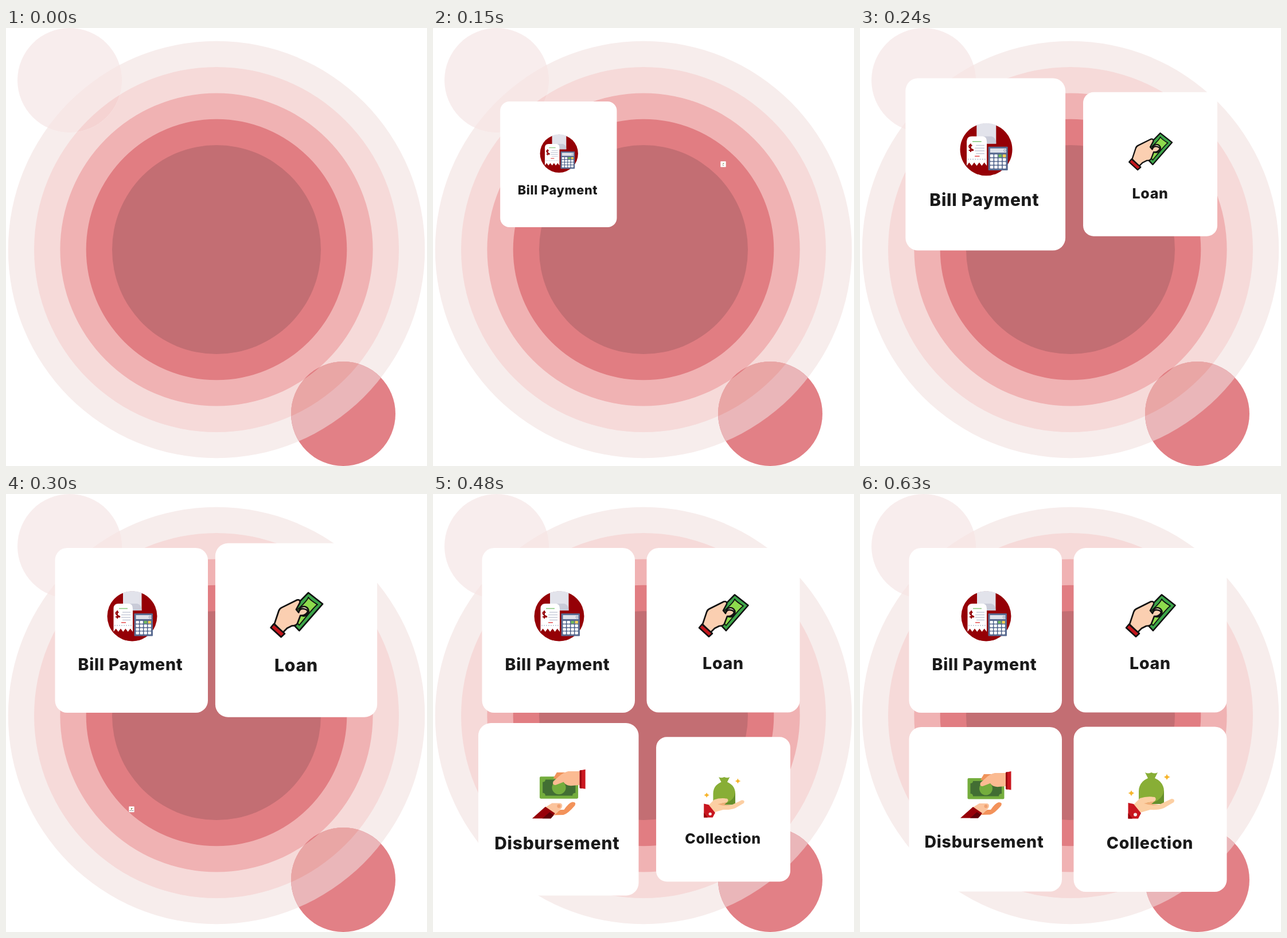
An HTML page for the animation above (2670 ms loop, 734 px wide and 763 px high).

```html
<!DOCTYPE html>
<html lang="en">
<head>
<meta charset="utf-8">
<title>Payment services</title>
<style>
html, body { margin: 0; width: 100%; height: 100%; overflow: hidden; background: #fff; }
svg { display: block; width: 734px; height: 763px; }
text { font: 800 28.5px Inter, "Open Sans", sans-serif; letter-spacing: .75px; text-anchor: middle; fill: #1a1a1a; }
.ink { stroke: #111; stroke-width: 2.6; stroke-linejoin: round; }
</style>
</head>
<body>
<svg viewBox="0 0 734 763">
  <defs>
    <clipPath id="top"><circle cx="111" cy="91" r="91"/></clipPath>
    <clipPath id="bottom"><circle cx="588" cy="672" r="91"/></clipPath>
  </defs>
  <g id="rings"></g>

  <g class="card">
    <rect x="85.5" y="94" width="266.5" height="287" rx="21" fill="#fff"/>
    <circle cx="220" cy="213" r="43.5" fill="#950006"/>
    <path d="M204 172Q220 166 236.500 172V203H204Z" fill="#e2e3eb"/>
    <path d="M215 191H229Q236.500 193 236.500 203H221Z" fill="#c9cbd8"/>
    <path d="M187.500 240V199Q188 191 196 191H215Q221 192 221 200V240l-4.200-5.500-4.200 5.500-4.200-5.500-4.200 5.500-4.200-5.500-4.200 5.500-4.200-5.500Z" fill="#fff"/>
    <g fill="none" stroke-width="1.5">
      <path d="M197 199.500H212" stroke="#84c77b"/>
      <path d="M203 206H217M201 210.500H217M201 215H217M203 219.500H217" stroke="#c6cad8"/>
      <path d="M201 224H209" stroke="#e34b4b"/>
      <path d="M189 229H220" stroke="#bbc1d0" stroke-dasharray="2 2"/>
      <path d="M196.500 206.500Q192 204 191.500 207T196.500 212.500 191 214M194 203V217" stroke="#950006" stroke-width="2"/>
    </g>
    <rect x="223.500" y="208" width="32.500" height="39.500" rx="1" fill="#596b91"/>
    <rect x="226.500" y="211" width="27" height="7" fill="#dfe2ea"/>
    <circle cx="251" cy="214.500" r="1.800" fill="none" stroke="#8791a9" stroke-width=".8"/>
    <g id="keys"></g>
    <text x="217" y="306.500">Bill Payment</text>
  </g>

  <g class="card">
    <rect x="372.500" y="94" width="267" height="286.500" rx="21" fill="#fff"/>
    <g class="ink">
      <path d="M526 175.500L549.500 194 511 238 488 214Z" fill="#3da64a"/>
      <path d="M526 183Q528 187 541 195 536 198 511 229L497 213Q524 190 526 183Z" fill="#8edb4d" stroke-width="1.800"/>
      <circle cx="518.500" cy="206" r="8" fill="#f7edcf"/>
      <path d="M470 227L477 206Q478 202 482 200L507 187.500Q513 186 512 192L506 203 510 208Q512 201 518 202 525 203 525 207 521 214 513 213L508 226Q506 230 499 230L491 234 484 241Z" fill="#fbcfb1"/>
      <path d="M469 227L487 243 481 248.500 464 233Z" fill="#c4161c"/>
    </g>
    <text x="506" y="305">Loan</text>
  </g>

  <g class="card">
    <rect x="85.500" y="406" width="266.500" height="286.500" rx="21" fill="#fff"/>
    <rect x="187.500" y="495" width="64" height="36.500" rx="2" fill="#74ad3d"/>
    <path d="M197 500H242Q242 504 247 504V522Q242 522 242 526.500H197Q197 522 192.500 522V504Q197 504 197 500Z" fill="#426e33"/>
    <circle cx="219.500" cy="513" r="11.500" fill="#74ad3d"/>
    <path d="M210 498L216 488H235L223 499Z" fill="#f0935b"/>
    <path d="M254 486H235Q226 488 219 495L210 503Q208 509 214 509L227 504Q232 511 242 510L254 509Z" fill="#fbbb92"/>
    <path d="M254 485L263.500 483V515.500L254 514Z" fill="#ca1820"/>
    <path d="M254 485L257 484V515L254 514Z" fill="#9a0710"/>
    <path d="M208 559L222 550H228Q236 538 242 537 249 537 246 543 234 557 227 558.500Z" fill="#f3925a"/>
    <path d="M195 547L208 539H222Q227 541 224 547L219 552Q214 559 207 559Z" fill="#fbc49d"/>
    <circle cx="219.500" cy="544" r="3" fill="#f0a273"/>
    <path d="M175 564.500L197 545 213 556 206 564.500Z" fill="#970009"/>
    <path d="M192 564.500L204 554 211 559 206 564.500Z" fill="#600008"/>
    <text x="216.500" y="616">Disbursement</text>
  </g>

  <g class="card">
    <rect x="372.500" y="405.500" width="267" height="287.500" rx="21" fill="#fff"/>
    <path d="M497 485Q502 488 508 485 514 488 519 485L514 495Q530 502 530 518V540H486V518Q486 502 502 495Z" fill="#88ae36"/>
    <path d="M530 516V540H500L514 536Q528 530 530 516Z" fill="#668f2b"/>
    <path d="M477 541L488 530Q500 526 514 528 518 532 513 535.500L500 538 506 541H522L543 531Q550 531 547 537L530 547Q520 551 506 550L489 555Z" fill="#fccfa3"/>
    <path d="M495 539L514 535 508 540 521 541Q510 544 495 539Z" fill="#f0ae79"/>
    <path d="M467.500 538L477 540 490 556 485 565.500H467.500Z" fill="#c8161f"/>
    <path d="M467.500 556L475 565.500H467.500Z" fill="#970009"/>
    <circle cx="480" cy="558.500" r="3" fill="#f4e9e9"/>
    <path d="M535 487.500Q536 492 541 493 536 494 535 498.500 534 494 529.500 493 534 492 535 487.500ZM473 516Q474 520 478.500 521 474 522 473 526.500 472 522 467.500 521 472 520 473 516Z" fill="#f7b52c"/>
    <text x="505.500" y="618">Collection</text>
  </g>
</svg>
<script>
const LOOP = 2670, TICK = 30;
const RADII = [363.3, 318, 272.6, 227.3, 182];
const $ = id => document.getElementById(id);

const disc = (x, y, r, fill) => `<circle cx="${x}" cy="${y}" r="${r}" fill="${fill}"/>`;
const rings = colors => colors.map((c, i) => disc(367, 386, RADII[i], c)).join("");
const bubble = (clip, x, y, fill, overlap) =>
  disc(x, y, 91, fill) + `<g clip-path="url(#${clip})">${rings(overlap)}</g>`;

$("rings").innerHTML =
  rings(["#f7edec", "#f6dad9", "#f0b2b3", "#e17d82", "#c36e73"]) +
  bubble("top", 111, 91, "#f8eded", ["#f7e7e6", "#f5d3d2"]) +
  bubble("bottom", 588, 672, "#e28086", ["#eab6b9", "#e9a6a5", "#e17d82"]);

let keys = "";
for (let i = 0; i < 16; i++) {
  const fill = { 2: "#70b95b", 3: "#f2cf55" }[i] || "#fff";
  keys += `<rect x="${226.5 + i % 4 * 7}" y="${221 + (i >> 2) * 6.2}" width="5.4" height="4.8" rx="1" fill="${fill}"/>`;
}
$("keys").innerHTML = keys;

// Pop-in scale: slow start, fast rise, small overshoot, settle.
const POP = [0, .006, .035, .108, .31, .876, 1.038, 1.057, 1.049, 1.007, 1];
function pop(p) {
  if (p <= 0) return 0;
  const i = Math.floor(p);
  return i >= POP.length - 1 ? 1 : POP[i] + (POP[i + 1] - POP[i]) * (p - i);
}

// x, y: centre; start and step of the pop-in, in ms
const MOTION = [
  { x: 219, y: 237.5, start: 18, step: 27.5 },
  { x: 506, y: 237.3, start: 90, step: 30 },
  { x: 219, y: 549.2, start: 240, step: 30 },
  { x: 506, y: 549.2, start: 330, step: 30 }
];
const cards = document.querySelectorAll(".card");

function draw() {
  const t = Math.floor(performance.now() % LOOP / TICK) * TICK;
  MOTION.forEach(({ x, y, start, step }, i) => {
    const s = pop((t - start) / step);
    cards[i].setAttribute("transform", `translate(${x} ${y}) scale(${s}) translate(${-x} ${-y})`);
    cards[i].setAttribute("visibility", s ? "visible" : "hidden");
  });
  requestAnimationFrame(draw);
}
draw();
</script>
</body>
</html>
```
